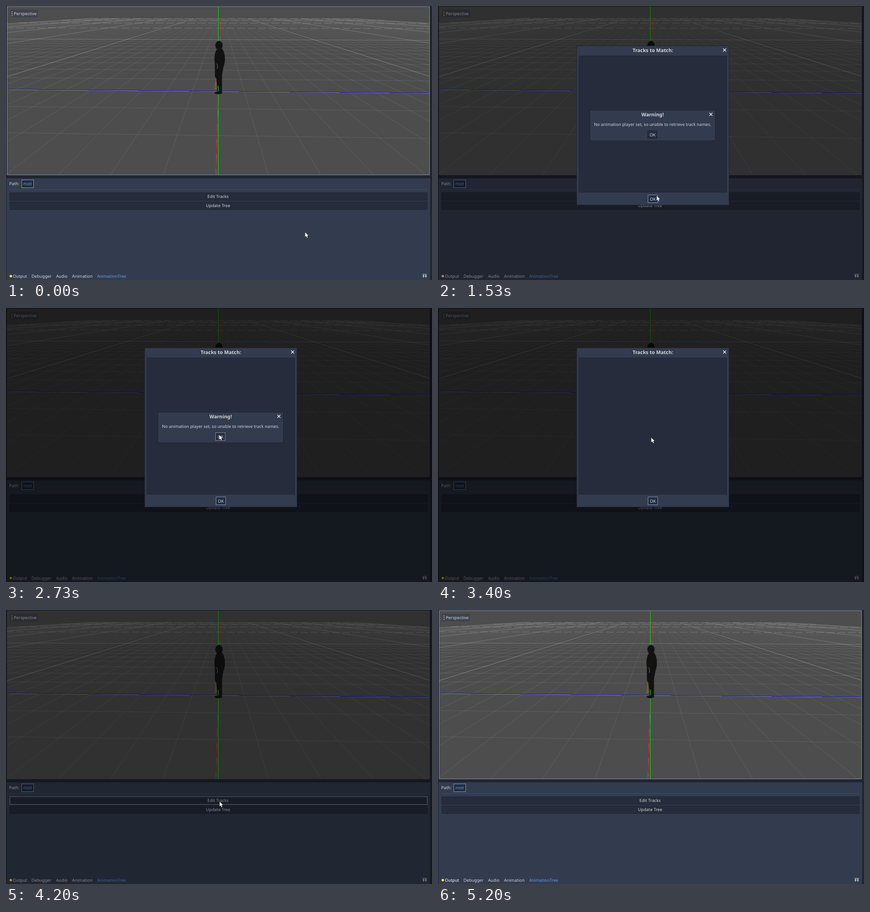
Recreate the animation shown at these times as an HTML page with a canvas. Size 932 px wide and 601 px high, loop 5.54 s.

```html
<!DOCTYPE html>
<html>
<head>
<meta charset="utf-8">
<style>
html, body { margin: 0; width: 100%; height: 100%; overflow: hidden; background: #202531; }
canvas { display: block; }
</style>
</head>
<body>
<canvas id="stage" width="932" height="601"></canvas>
<script>
const c = document.getElementById('stage').getContext('2d');
const LOOP = 5540, STEP = 200 / 3;
const BASE = '#333b4f', DARK = '#262c3b', EDGE = '#202531', ACCENT = '#699ce8',
      TEXT = '#d3d5da', BRIGHT = '#ffffff', HOVER = '#868fa3';

// Steps at which windows open, close and are clicked
const OPEN = 22, WARN_CLICK = 50, MAIN_CLICK = 61, REFOCUS = 68;

// Pointer glides: first step, last step, destination
const glides = [
  [0, 9, 478, 418], [13, 14, 478, 416], [27, 36, 466, 261], [36, 38, 468, 285],
  [39, 41, 466, 278], [50, 58, 467, 420], [63, 68, 881, 158], [69, 78, 8, 608]
];

const clamp = (v, max) => Math.max(0, Math.min(max, v));

function pointer(n) {
  return glides.reduce(([x, y], [from, to, tx, ty]) => {
    const t = clamp((n - from) / (to - from), 1), e = t * t * (3 - 2 * t);
    return [x + (tx - x) * e, y + (ty - y) * e];
  }, [654, 496]);
}

function box(x, y, w, h, fill, border) {
  c.fillStyle = border || fill;
  c.fillRect(x, y, w, h);
  c.fillStyle = fill;
  if (border) c.fillRect(x + 1, y + 1, w - 2, h - 2);
}

function text(s, x, y, color = TEXT, align = 'left', font = '9.25px') {
  c.font = font + ' "Noto Sans", "Open Sans", sans-serif';
  c.textAlign = align;
  c.fillStyle = color;
  c.fillText(s, x, y);
}

function trace(points) {
  c.beginPath();
  points.forEach(p => c.lineTo(...p));
}

function line(points, color, width = 1) {
  c.strokeStyle = color;
  c.lineWidth = width;
  trace(points);
  c.stroke();
}

function shape(points, color) {
  c.fillStyle = color;
  trace(points);
  c.fill();
}

function oval(x, y, rx, ry, color) {
  c.fillStyle = color;
  c.beginPath();
  c.ellipse(x, y, rx, ry, 0, 0, 7);
  c.fill();
}

// Ground plane to screen: u runs sideways, d runs into the distance
function ground(u, d) {
  const s = 1 / (.005618 + .00099 * d - .0000156 * u);
  return [470.1 + (.3184 * u - .031) * s, 9.35 + s];
}

// White that thins out towards the horizon
function haze(far, near) {
  const g = c.createLinearGradient(0, 26, 0, 110);
  g.addColorStop(0, `rgba(255,255,255,${far})`);
  g.addColorStop(1, `rgba(255,255,255,${near})`);
  return g;
}

function grid() {
  const minor = haze(.025, .1), major = haze(.2, .33);
  for (let i = -50; i <= 50; i++) {
    const color = i % 10 ? minor : major;
    line([ground(i, -3), ground(i, 50)], color);
    if (i < -2) continue;
    c.setLineDash(i > 10 && color === major ? [18, 5] : []);
    line([ground(-50, i), ground(50, i)], color);
    c.setLineDash([]);
  }
}

function axes() {
  for (let x = 2; x < 927; x++) box(x, Math.round(182.5 + (x - 70) / 110), 1, 1, '#1414d2');
  for (let y = 27; y < 371; y++) box(Math.round(469.3 - (y - 9) * .031), y, 1, 1, '#c41c1c');
  box(464, 1, 1, 370, '#08e008');
}

function figure() {
  const skin = '#121212', bone = '#c08a42';
  oval(466, 86.5, 8, 10, skin);
  oval(467.5, 116, 11.5, 25, skin);
  shape([[457, 120], [478, 120], [472.5, 152], [472.5, 189], [463, 189], [457, 152]], skin);
  oval(464.5, 190.5, 8.5, 3, skin);
  line([[461, 126], [463, 132], [462, 138]], bone, .8);
  line([[458.5, 157], [462, 180], [457, 182], [460, 160]], bone, .8);
  box(464, 175, 1, 12, '#20f020');
}

function viewport(focused) {
  box(2, 1, 925, 370, '#4d4d4d');
  c.save();
  c.beginPath();
  c.rect(2, 1, 925, 370);
  c.clip();
  grid();
  axes();
  figure();
  c.restore();
  if (focused) {
    c.strokeStyle = '#8694ae';
    c.lineWidth = 1;
    c.strokeRect(2.5, 1.5, 924, 369);
  }
  box(9, 8, 61, 17, 'rgba(51,59,79,.5)');
  for (let y = 12; y < 22; y += 4) box(12.5, y, 1.5, 2, '#c4c6cc');
  text('Perspective', 17, 20);
}

function wideButton(label, y, n, [px, py]) {
  const over = n > MAIN_CLICK && px > 8 && px < 921 && py > y && py < y + 18;
  box(8, y, 914, 18, DARK, over ? HOVER : EDGE);
  text(label, 464, y + 12, TEXT, 'center');
}

function tabs(hovered) {
  oval(10.5, 592.5, 2.8, 2.8, '#ffdd65');
  let x = 15;
  for (const name of ['Output', 'Debugger', 'Audio', 'Animation', 'AnimationTree']) {
    const color = name === 'AnimationTree' ? ACCENT : name === hovered ? BRIGHT : TEXT;
    text(name, x, 596, color);
    x += c.measureText(name).width + 9.8;
  }
  box(911, 588, 10, 1, TEXT);
  for (const x of [913.5, 918.5]) {
    line([[x, 596], [x, 590]], TEXT, 1.4);
    shape([[x - 2.4, 593], [x, 589.5], [x + 2.4, 593]], TEXT);
  }
}

function panel(n, at) {
  box(1, 378, 927, 223, BASE);
  text('Path:', 7, 393);
  box(34, 381, 27, 18, DARK, ACCENT);
  text('root', 47.3, 393, ACCENT, 'center');
  box(7, 402, 914, 1, '#3d4c6c');
  wideButton('Edit Tracks', 409, n, at);
  wideButton('Update Tree', 429, n, at);
  tabs(n > 76 && 'Output');
}

function popup(name, x, y, w, h, okBorder, okColor) {
  const mid = x + w / 2, cx = x + w - 10, cy = y + 9.5, r = 3.2, okY = y + h - 23;
  box(x, y, w, h, BASE, EDGE);
  text(name, mid, y + 14, TEXT, 'center', 'bold 10.8px');
  for (const s of [-r, r]) line([[cx - r, cy - s], [cx + r, cy + s]], '#e8e9ec', 1.5);
  box(Math.floor(mid) - 11, okY, 22, 18, DARK, okBorder);
  text('OK', mid, okY + 12.5, okColor, 'center');
}

function dialogs(n) {
  if (n < OPEN || n > MAIN_CLICK) return;
  popup('Tracks to Match:', 303, 87, 334, 350, ACCENT, n === MAIN_CLICK ? ACCENT : TEXT);
  box(308, 109, 324, 300, DARK, EDGE);
  if (n > WARN_CLICK) return;
  popup('Warning!', 332, 228, 275, 68, n > 36 ? HOVER : EDGE, n === WARN_CLICK ? ACCENT : TEXT);
  text('No animation player set, so unable to retrieve track names.', 469.5, 262.5, TEXT, 'center');
}

function cursor([x, y]) {
  c.save();
  c.translate(x + .5, y + .5);
  const arrow = [[0, 0], [0, 10], [2.4, 8], [4.2, 12], [5.8, 11.3], [4.1, 7.4], [7, 7], [0, 0]];
  line(arrow, '#101010');
  shape(arrow, BRIGHT);
  c.restore();
}

function draw(n) {
  const at = pointer(n);
  const dim = clamp(Math.min((n - 21.33) * .225, (64.6 - n) * .225), .6);
  box(0, 0, 932, 601, EDGE);
  viewport(n < OPEN || n >= REFOCUS);
  panel(n, at);
  box(0, 0, 932, 601, `rgba(0,0,0,${dim})`);
  dialogs(n);
  cursor(at);
}

c.textRendering = 'geometricPrecision';
let last = -1;
function tick() {
  const n = Math.floor((performance.now() % LOOP + 4) / STEP);
  if (n !== last) draw(last = n);
  requestAnimationFrame(tick);
}
tick();
</script>
</body>
</html>
```
